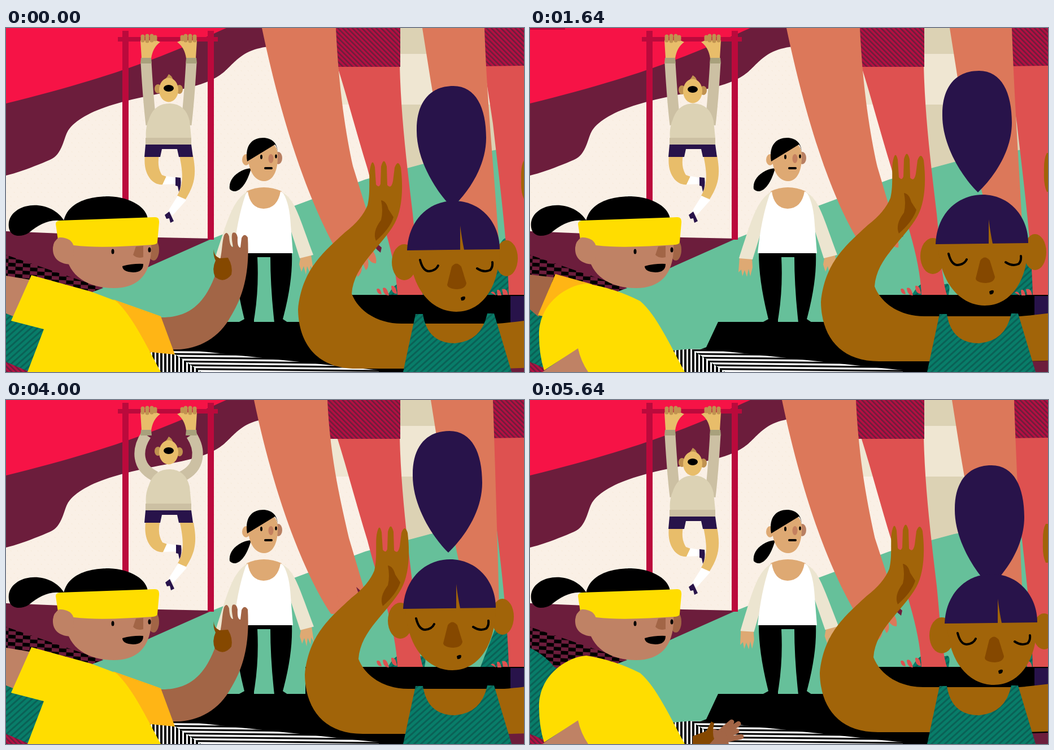
These frames come from a looping animation (917 by 611 pixels, 5760 ms). An HTML page:

```html
<!DOCTYPE html>
<html lang="en">
<head>
<meta charset="utf-8">
<title>Workout class</title>
<style>
html, body { margin: 0; width: 100%; height: 100%; overflow: hidden; background: #000 }
svg { display: block; width: 100vw; height: 100vh }
.skin { fill: #a16409 } .shade { fill: #854800 } .navy { fill: #28134a }
.coral { fill: #dc785a } .red { fill: #de5150 } .bar { fill: #bb0a3c }
.maroon { fill: #6c1d3c } .gold { fill: #ffdd00 } .amber { fill: #ffb515 }
.rose { fill: #bf8265 } .umber { fill: #a26546 } .tan { fill: #dea973 }
.wheat { fill: #e8bd6a } .ochre { fill: #c09250 } .wool { fill: #dcd2b4 }
.cuff { fill: #a8a17c } .linen { fill: #ece5d0 } .white { fill: #fff }
.teal { fill: url(#teal) }
.line { fill: none; stroke: #000; stroke-width: 4; stroke-linecap: round }
.fingers { fill: none; stroke-width: 9; stroke-linecap: round }
</style>
</head>
<body>
<svg viewBox="0 0 917 611" preserveAspectRatio="none">
<defs>
  <pattern id="teal" width="8" height="8" patternUnits="userSpaceOnUse" patternTransform="rotate(48)">
    <rect width="8" height="8" fill="#087d69"/><rect width="3" height="8" fill="#0a6156"/>
  </pattern>
  <pattern id="hatch" width="6" height="6" patternUnits="userSpaceOnUse" patternTransform="rotate(-45)">
    <rect width="6" height="6" fill="#b50f42"/><rect width="2.6" height="6" fill="#6c1d3c"/>
  </pattern>
  <pattern id="check" width="26" height="13" patternUnits="userSpaceOnUse" patternTransform="rotate(3)">
    <rect width="26" height="13" fill="#6c1d3c"/><path d="M0 0h13v6.5H0zM13 6.5h13V13H13z"/>
  </pattern>
  <pattern id="rows" width="9" height="6.6" patternUnits="userSpaceOnUse" patternTransform="rotate(0.6)">
    <rect width="9" height="6.6" fill="#fff"/><rect width="9" height="3.2"/>
  </pattern>
  <pattern id="cols" width="7" height="9" patternUnits="userSpaceOnUse">
    <rect width="7" height="9" fill="#fff"/><rect width="4" height="9"/>
  </pattern>
  <pattern id="dots" width="12" height="16" patternUnits="userSpaceOnUse">
    <rect width="12" height="16" fill="#faf0e6"/>
    <path d="M2 3l1.5 2M8 11l1.5 2" stroke="#f6e8d7"/>
  </pattern>
  <path id="armUp" d="M250 514H274C330 515 354 482 370 440C384 408 381 385 386 368Q391 359 395 370Q396 389 402 389Q398 369 401 364Q408 361 410 372Q409 390 415 390L417 373Q422 363 428 372C431 425 424 470 398 512C378 550 340 572 298 571L250 576Z"/>
</defs>

<!-- room -->
<rect width="917" height="611" fill="url(#dots)"/>
<path d="M570 0H917V136H570Z" fill="#efe6d2"/>
<path class="wool" d="M690 0H917V46H690ZM690 136H917V260H690Z"/>
<path class="maroon" d="M0 0H465V33C405 40 402 74 368 90C328 112 255 115 190 136C150 148 122 164 110 182C102 195 100 225 78 234C55 244 25 256 0 262Z"/>
<path d="M0 0H390C310 36 220 80 0 134Z" fill="#f61346"/>
<rect class="bar" id="corner"/>
<path class="maroon" d="M0 361L270 372L365 374L300 420L150 490L0 500Z"/>
<path d="M110 488L365 374L510 316L636 269L751 238L870 216L917 207V611H0V500Z" fill="#66c09a"/>
<path class="teal" d="M0 440Q25 452 45 475L110 520V611H0Z"/>
<path d="M0 403L172 462L152 469L44 475Q25 452 0 440Z" fill="url(#check)"/>
<path d="M0 593L42 611H0Z" fill="url(#hatch)"/>
<path d="M333 522H530V474H917V611H650L298 572L312 567Z"/>
<path d="M285 570L314 571L660 608V611H345Z" fill="url(#rows)"/>
<path d="M252 573L285 570L345 611H262Z" fill="url(#cols)"/>
<path class="maroon" d="M800 595L917 591V611H800Z"/>
<path class="navy" d="M893 476H917V525H893ZM880 380Q900 420 897 470H880Z"/>
<path class="teal" d="M676 474Q688 455 694 455H735Q746 450 741 474ZM840 474L872 390Q880 370 888 374L890 474Z"/>

<!-- big legs -->
<path class="red" d="M586 66H697C699 150 708 230 720 330C726 390 728 440 738 474H693C690 400 660 330 640 250C620 185 606 130 586 66ZM846 64H917V474H890C888 380 872 260 862 170Z"/>
<path d="M560 0H698V69H560ZM840 0H917V67L840 68Z" fill="url(#hatch)"/>
<path class="red" d="M656 464q6-5 9 9q-8 0-9-9zM667 462q7-4 11 13q-10 0-11-13zM682 458q8-2 10 14q-10 0-10-14zM858 470q6-5 9 5zM869 466q5-5 8 9h-7zM878 464q9-3 11 10h-9z"/>
<path class="coral" id="legL"/>
<path class="coral" id="legR"/>
<g id="foot"><path class="maroon" d="M645 372L665 390L663 399Q650 390 645 372Z"/>
  <path class="coral" d="M610 380L640 385Q658 402 655 418Q646 418 640 408Q644 425 637 430L630 415Q632 436 622 442Z"/></g>

<!-- pull-up -->
<path class="bar" d="M206 5H217V320H206ZM357 5H368V376H357ZM198 16H375V24H198Z"/>
<g id="legs">
  <path class="wheat" d="M246 226H271Q267 247 276 261L284 264L278 278C258 280 242 258 246 226ZM307 226H331C338 262 333 280 318 304L303 298C314 278 314 260 307 226Z"/>
  <path class="white" d="M284 263L301 266L300 277L277 278ZM304 298L319 306L295 333L287 325Z"/>
  <path class="navy" d="M300 265L309 266Q311 282 306 291L304 281L300 280ZM281 332L289 326L297 343L291 346L289 338L284 339Z"/>
</g>
<g fill="none" stroke="#ccc0a3" stroke-width="19"><path id="sleeveL"/><path id="sleeveR"/></g>
<g id="trunk">
  <path class="wool" d="M248 196Q246 178 253 162Q262 134 290 134Q318 135 325 165L328 196Z"/>
  <path d="M247 195H328V208H247Z" fill="#ccc0a3"/>
  <path class="navy" d="M247 207H328L331 229H306L303 215H276L273 229H245Z"/>
</g>
<g id="manHead">
  <path class="ochre" d="M279 92Q284 90 288 82Q293 84 296 92Z"/>
  <ellipse class="ochre" cx="269" cy="108" rx="6" ry="8"/><ellipse class="ochre" cx="307" cy="109" rx="6" ry="8"/>
  <ellipse class="wheat" cx="288" cy="110" rx="17" ry="21.5"/><ellipse cx="288" cy="107" rx="9" ry="6"/>
</g>
<g id="grip">
  <path class="wheat" d="M238 22H266L273 25Q260 34 257 54H240Z"/><path class="cuff" d="M239 53H257L258 63H238Z"/>
  <path class="fingers" d="M242 15V22M250 14V23M258 14V22M264 16V20" stroke="#c09250" style="stroke-width:7"/>
</g>
<use href="#grip" transform="matrix(-1 0 0 1 576 0)"/>

<!-- standing woman -->
<g id="armA"><path class="tan" d="M371 405L393 407L394 425L390 441L387 428L384 442L380 430L376 441L374 429L369 434Z"/>
  <path class="linen" d="M428 290C402 306 394 335 370 409L394 411L416 340Z"/></g>
<g id="armB"><path class="tan" d="M522 404L540 402L544 431L539 422L538 435L533 423L531 438L527 423L523 433L519 420Z"/>
  <path class="linen" d="M486 290C511 303 516 327 544 403L520 409L498 340Z"/></g>
<path class="tan" d="M426 290Q456 276 488 290L480 324H432Z"/>
<path class="white" d="M424 296L428 290Q432 320 456 321Q481 320 486 290L491 294Q502 312 504 350L508 400H403Q409 340 424 296Z"/>
<path d="M405 400H506Q508 450 490 517L499 523H475Q468 460 468 407H445Q448 465 439 518V523H411L422 517Q405 450 405 400Z"/>
<g id="face">
  <path d="M434 249C415 250 393 266 396 286C406 297 424 286 434 249Z"/>
  <ellipse class="tan" cx="425" cy="234" rx="7" ry="10"/><ellipse cx="482" cy="231" rx="7" ry="11" fill="#b98062"/>
  <path class="tan" d="M428 225Q440 204 470 205Q482 210 481 230C481 255 472 272 457 272C440 272 429 254 428 225Z"/>
  <path d="M427 237C422 206 438 195 455 195C470 195 481 204 481 222Q480 210 476 207Z"/>
  <ellipse cx="452" cy="229" rx="2" ry="4"/><ellipse cx="478" cy="228" rx="1.8" ry="3.4"/>
  <ellipse cx="469" cy="232" rx="4.5" ry="8" fill="#c4805f"/><path class="line" d="M459 249H470"/>
</g>

<!-- girl in yellow -->
<g id="farUp">
  <use href="#armUp" class="umber"/>
  <path class="shade" d="M368 393Q367 404 378 409L393 408Q402 423 399 438Q386 455 370 442Q364 428 371 413Q366 403 368 393Z"/>
  <path class="rose" d="M0 440L42 447L20 515L0 507Z"/>
  <path class="amber" d="M190 482L274 512L299 580L250 575Z"/>
  <path class="gold" d="M45 439L150 468L195 485C222 510 244 555 274 611H38L67 535L9 520Z"/>
</g>
<g id="down">
  <g id="farBack"><path class="umber" d="M0 438L42 443L15 513L0 500Z"/><path class="amber" d="M45 437L110 455L60 520L14 510Z"/></g>
  <g id="farLow"><path class="fingers" d="M320 604L357 572M326 605L369 575M330 606L366 588M325 608L374 598" stroke="#a26546"/>
    <path class="umber" d="M296 611L324 584L346 590L352 611Z"/>
    <path class="shade" d="M288 597L312 588L321 571L326 574Q322 592 326 602L318 611H288Z"/></g>
  <path class="rose" d="M22 611L87 566L104 611Z"/>
  <path class="gold" d="M100 454C65 456 15 490 16 545Q16 580 25 608L85 569Q90 592 103 611H274C244 555 222 508 195 485Q150 462 100 454Z"/>
</g>
<g id="nearUp">
  <path class="umber" d="M0 438L42 443L15 510L0 502ZM360 397Q366 404 374 405L372 427Q357 418 360 397Z"/>
  <path class="amber" d="M45 437L105 455L70 532L14 510Z"/>
  <use href="#armUp" class="rose" transform="translate(-7 2)"/>
  <path class="gold" d="M100 454L190 482L275 512L299 580L258 576L274 611H38L68 531Z"/>
</g>
<g id="girlHead">
  <ellipse class="umber" cx="261" cy="394" rx="10" ry="19"/>
  <path d="M104 344C80 302 12 308 5 345C2 372 25 373 40 364C60 348 80 337 104 344ZM102 344C110 303 160 299 182 299C222 300 250 320 251 340Z"/>
  <path class="rose" d="M105 375L257 380C260 438 233 462 191 462C145 462 110 440 106 400Z"/>
  <path class="gold" d="M88 348Q88 343 95 342L264 336Q272 336 271 346L268 380Q268 384 260 385C210 388 160 391 120 386L92 376Z"/>
  <path class="rose" d="M94 372C112 372 120 380 120 392L118 420C95 420 82 410 83 390Q84 378 94 372Z"/>
  <path class="umber" d="M230 388L243 387V407Q232 410 225 403Z"/>
  <ellipse cx="189" cy="397" rx="2.5" ry="4.5"/><ellipse cx="254" cy="394" rx="2.5" ry="4.5"/>
  <path d="M206 423Q225 418 243 419Q243 434 225 434Q206 433 206 423Z"/>
</g>

<!-- woman in front -->
<g id="body">
  <path class="skin" d="M640 315C646 290 641 262 645 247Q649 230 653 247L655 278Q660 285 663 277L664 246Q669 227 674 246L675 279Q682 287 685 272L688 248Q694 232 699 248C704 290 700 325 688 347C664 390 616 420 612 472C625 505 660 525 700 525H870Q895 523 940 517V603L880 605H620C550 605 518 560 517 500C524 430 560 400 600 363Q630 340 640 315Z"/>
  <path class="shade" d="M664 306Q673 307 677 322L686 336Q680 356 655 378Q648 362 664 341Q668 325 664 306Z"/>
  <path class="skin" d="M917 235Q911 245 912 270Q911 292 917 304H940V235Z"/>
</g>
<path class="teal" d="M725 508H738Q746 560 795 560Q842 556 852 507H864L895 611H703Z"/>
<path class="navy" id="puff" d="M790 319C766 296 726 238 727 180C727 130 752 103 792 103C832 103 850 142 850 195C850 245 820 290 790 319Z"/>
<g id="head">
  <ellipse class="skin" cx="705" cy="416" rx="22" ry="32"/><ellipse class="skin" cx="886" cy="409" rx="20" ry="32"/>
  <path class="skin" d="M714 385C714 465 755 504 797 504C840 504 875 465 874 385Z"/>
  <path class="navy" d="M710 395C712 340 750 307 793 307C840 307 874 345 874 393Z"/>
  <path class="skin" d="M804 351Q807 375 811 394H804Z"/>
  <path class="line" d="M733 412Q738 432 749 432Q761 431 765 422M834 427Q846 435 857 430Q862 425 861 416"/>
  <path class="shade" d="M789 424Q797 413 806 424L815 453Q814 463 799 464Q782 463 781 456Z"/>
  <path d="M805 479Q811 475 813 478Q813 485 806 484Z"/>
</g>
</svg>
<script>
const LOOP = 5760, TICK = 40;
const el = id => document.getElementById(id);
const mix = (a, b, k) => a + (b - a) * k;
const move = (id, x, y) => el(id).setAttribute('transform', `translate(${x} ${y})`);
const show = (id, on) => el(id).style.display = on ? '' : 'none';
const draw = (id, d) => el(id).setAttribute('d', d);

// Piecewise-linear curve through [time, value] points.
function curve(points, t) {
  let i = 1;
  while (i < points.length - 1 && t > points[i][0]) i++;
  const [a, u] = points[i - 1], [b, v] = points[i];
  return mix(u, v, Math.min(1, Math.max(0, (t - a) / (b - a))));
}

// The class moves in short bursts from pose 0 to pose 6.
const beat = [[0, 0], [800, 0], [1000, 1], [1400, 1], [1480, 2], [1800, 2], [2000, 2.5], [2200, 2.5],
  [2480, 3], [2800, 3], [3000, 4], [3800, 4], [4000, 5], [4800, 5], [5000, 5.5], [5200, 5.5], [5280, 6], [5760, 6]];
const pull = [[2800, 0], [3000, 1], [4400, 1], [4480, 0]];
const pose = {
  headX: [0, -2, 8, 6, 6, -7, 24], headY: [0, -4, -11, -13, -23, -24, 2],
  puffX: [0, -2, 3, 8, -6, -7, 25], puffY: [0, -11, -27, -14, -34, -48, 13],
  bodyX: [0, 3, -2, 11, 1, 12, -4], bodyY: [0, -8, -13, 0, 0, -12, -15],
  thighL: [453, 453, 454, 452, 447, 439, 446], thighR: [584, 584, 584, 577, 577, 569, 577],
  legX: [0, 3, 6, 7, 4, 15, 10],
  footX: [0, 0, -3, -20, -22, -25, -6], footY: [0, -13, -28, -77, -50, -40, -16],
  sway: [0, 2, 0, 5, 1, 1, 2.5], chin: [0, 1, 2, 0, 0, 0, 3]
};

function girlPose(t) {
  if (t >= 5640) return 'low';
  const c = t % 1000;
  return c < 120 ? 'far' : c < 160 ? 'low' : c < 320 ? 'mid' : c < 640 ? 'near'
    : c < 680 ? 'mid' : c < 840 ? 'low' : 'far';
}

function render(t) {
  const v = curve(beat, t), i = Math.min(5, Math.floor(v)), p = {};
  for (const k in pose) p[k] = mix(pose[k][i], pose[k][i + 1], v - i);

  move('head', p.headX, p.headY);
  move('puff', p.puffX, p.puffY);
  move('body', p.bodyX, p.bodyY);
  move('foot', p.footX, p.footY);

  const a = p.thighL, b = p.thighR, s = (a - 453) / 2, r = p.legX, x = p.footX, y = p.footY / 2;
  draw('legL', `M${a} 0H${b}C${b + 5} 110 ${602 + s} 190 ${614 + s} 245L${645 + x / 3} 345L${620 + x} ${400 + y}H${588 + x / 2}C${545 + s} 325 ${495 + 2 * s} 200 ${a} 0Z`);
  draw('legR', `M${737 + r} 0H${847 + r}C${851 + r} 120 ${862 + r / 2} 230 874 400H830C800 300 ${766 + r} 180 ${752 + r} 95Z`);

  const bar = el('corner'), wide = v >= 1 && v < 2.5, box = v >= 2.5 && v <= 4;
  bar.setAttribute('width', wide ? 62 : box ? 23 : 0);
  bar.setAttribute('height', wide ? 3 : 17);

  const u = curve(pull, t);
  const sleeve = f => `M${f(248)} 62C${f(250 - 19 * u)} ${95 - 7 * u} ${f(252 - 21 * u)} ${130 - 10 * u} ${f(257 + 8 * u)} ${172 - 36 * u}`;
  draw('sleeveL', sleeve(x => x));
  draw('sleeveR', sleeve(x => 576 - x));
  move('trunk', 0, -11 * u);
  move('legs', u, -8 * u);
  move('manHead', 0, p.chin - 17 * u);

  const turned = t >= 2240 && t < 3960;
  el('face').setAttribute('transform', turned ? 'matrix(-1 0 0 1 911 -5)' : '');
  el('armA').setAttribute('transform', `rotate(${-p.sway / 2} 425 295)`);
  el('armB').setAttribute('transform', `rotate(${-p.sway / 2} 488 295)`);

  const g = girlPose(t), c = t % 1000;
  show('farUp', g === 'far');
  show('nearUp', g === 'near');
  show('down', g === 'mid' || g === 'low');
  show('farBack', g === 'mid');
  show('farLow', g === 'low');
  move('girlHead', t >= 5480 || (c >= 480 && c < 920) ? -3 : 0, 0);
}

const start = performance.now();
function loop() {
  const t = (performance.now() - start) % LOOP;
  render(Math.floor(t / TICK) * TICK);
  requestAnimationFrame(loop);
}
render(0);
requestAnimationFrame(loop);
</script>
</body>
</html>
```
